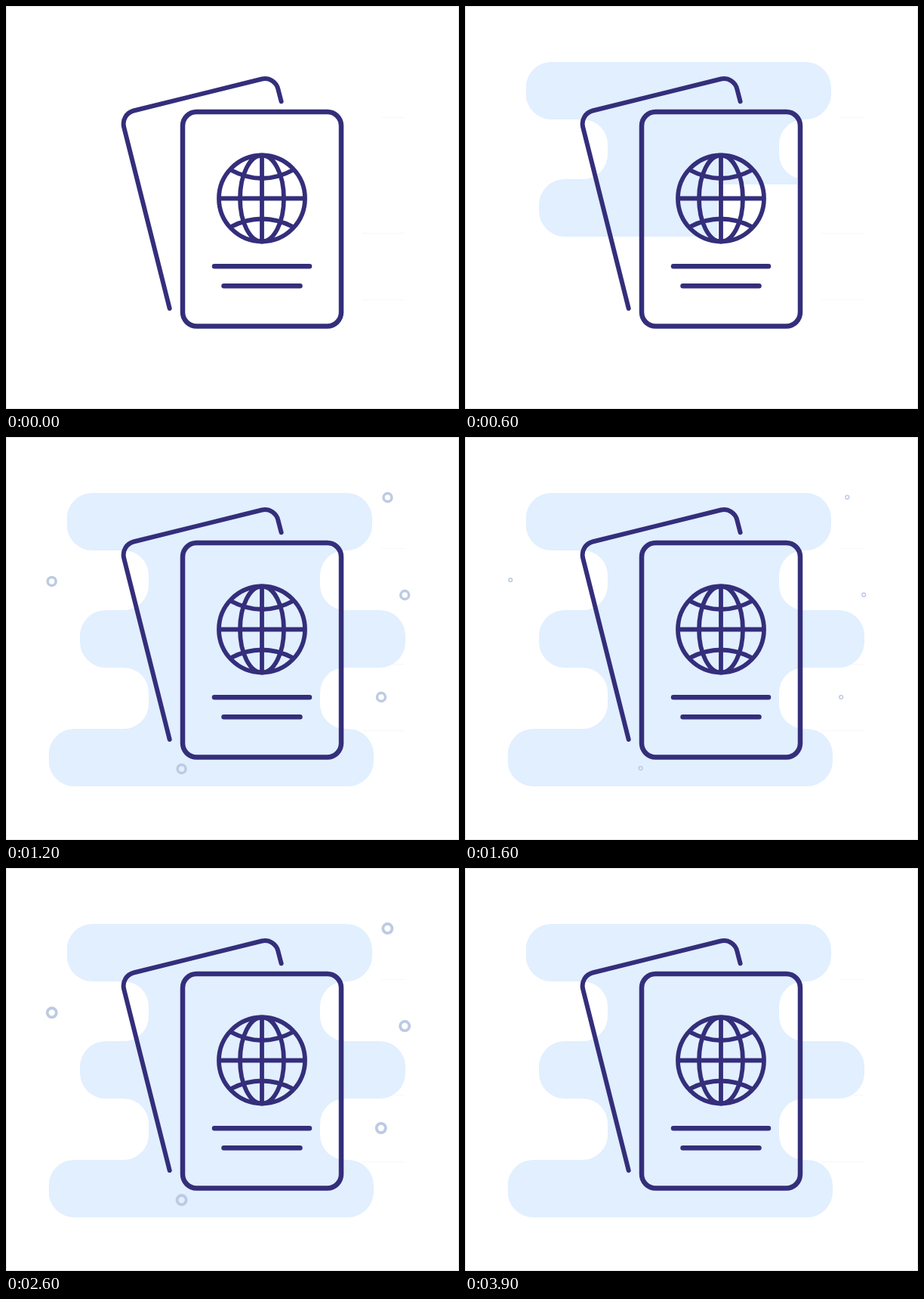
Recreate the animation shown at these times as an HTML page. Size 600 by 533 pixels, loop 4.5 s.

```html
<!DOCTYPE html>
<html lang="en">
<head>
<meta charset="utf-8">
<title>Travel documents</title>
<style>
  html, body { margin: 0; width: 100%; height: 100%; overflow: hidden; background: #fff; }
  svg { display: block; width: 100vw; height: 100vh; }
</style>
</head>
<body>
<svg id="stage" viewBox="0 0 600 533">
  <defs id="defs"></defs>
  <rect x=".5" y=".5" width="599" height="532" fill="#fff" stroke="#e5e5e5"/>
  <path d="M497 147.5H528M472 300.5H528M472 388.5H528" stroke="#f7f7f7"/>
  <g id="cloud" fill="#e1effe"></g>
  <g id="dots" fill="none" stroke="#bccbe2"></g>
  <g fill="none" stroke="#342e7b" stroke-width="6.5" stroke-linecap="round">
    <path stroke-width="6" d="M364.6 126.3L360.5 110.5A18 18 0 0 0 339 96.5L169 138.5A18 18 0 0 0 156 159.5L216.7 400"/>
    <rect x="234" y="140" width="210" height="283.5" rx="18.5"/>
    <g stroke-width="5.8" stroke-linecap="butt">
      <circle cx="339" cy="254.5" r="57"/>
      <ellipse cx="339" cy="254.5" rx="29" ry="57"/>
      <path d="M339 198V311M282 254.5H396M298 217Q339 239 380 217M298 292Q339 271 380 292"/>
    </g>
    <path d="M276 344.3H402M288.5 370.3H389.5"/>
  </g>
</svg>
<script>
const LOOP = 4500, STEP = 100, DOTS_IN = 1000, DOTS_OUT = 3900;
const byId = id => document.getElementById(id);

function add(parent, tag, attrs) {
  const el = document.createElementNS('http://www.w3.org/2000/svg', tag);
  for (const k in attrs) el.setAttribute(k, attrs[k]);
  parent.appendChild(el);
  return el;
}

const progress = (t, from, to) => Math.min(1, Math.max(0, (t - from) / (to - from)));

// Each cloud part is uncovered by a wipe, across for bars and down for necks.
const wipes = [];
function addWipe(tag, attrs, box, down, from, to) {
  const id = 'wipe' + wipes.length;
  const [x, y, width, height] = box;
  const clip = add(add(byId('defs'), 'clipPath', { id }), 'rect', { x, y, width, height });
  add(byId('cloud'), tag, { ...attrs, 'clip-path': `url(#${id})` });
  wipes.push({ clip, side: down ? 'height' : 'width', size: down ? height : width, from, to });
}

function addBar(x, y, width, from, to) {
  addWipe('rect', { x, y, width, height: 76, rx: 34 }, [x, y, width, 76], false, from, to);
}

function addNeck(top, bottom, end, from, to) {
  const arc = (x, y) => `A33 33 0 0 1 ${x} ${y}`;
  const d = `M156 ${top}${arc(189, top + 33)}V${bottom - 33}${arc(156, bottom)}H161V${end}H440V${bottom}H449` +
    `${arc(416, bottom - 33)}V${top + 33}${arc(449, top)}Z`;
  addWipe('path', { d }, [150, top - 1, 305, end - top + 1], true, from, to);
}

addBar(80.5, 74, 404.5, 320, 530);
addNeck(150, 229, 236, 440, 600);
addBar(98, 229, 431, 478, 700);
addNeck(305, 386, 388, 640, 800);
addBar(56.5, 386, 430.5, 778, 1000);

// Ring centres drift with their size: x, y, then drift per unit of radius.
const dots = [
  [59.9, 187.5, .1, .48],
  [506.8, 79.4, -.18, .08],
  [528.2, 208.4, 0, .08],
  [499, 344, -.28, 0],
  [232.6, 437.5, 0, .2]
].map(([x, y, dx, dy]) => ({ x, y, dx, dy, el: add(byId('dots'), 'circle', {}) }));

const pulse = [[1000, 8], [1850, 1.9], [2500, 8.3], [3200, 2.5], [3900, 8.6]];

function radiusAt(t) {
  const i = Math.max(1, pulse.findIndex(p => p[0] >= t));
  const [t0, r0] = pulse[i - 1], [t1, r1] = pulse[i];
  return r0 + (r1 - r0) * (1 - Math.cos(Math.PI * progress(t, t0, t1))) / 2;
}

function draw(time) {
  const t = Math.floor((time % LOOP) / STEP) * STEP;
  for (const w of wipes) w.clip.setAttribute(w.side, w.size * progress(t, w.from, w.to));

  const shown = t >= DOTS_IN && t < DOTS_OUT;
  byId('dots').setAttribute('visibility', shown ? 'visible' : 'hidden');
  if (!shown) return;
  const r = radiusAt(t);
  byId('dots').setAttribute('stroke-width', r * .48);
  for (const p of dots) {
    p.el.setAttribute('cx', p.x + p.dx * r);
    p.el.setAttribute('cy', p.y + p.dy * r);
    p.el.setAttribute('r', r * .76);
  }
}

const start = performance.now();
function tick() {
  draw(performance.now() - start);
  requestAnimationFrame(tick);
}
tick();
</script>
</body>
</html>
```
